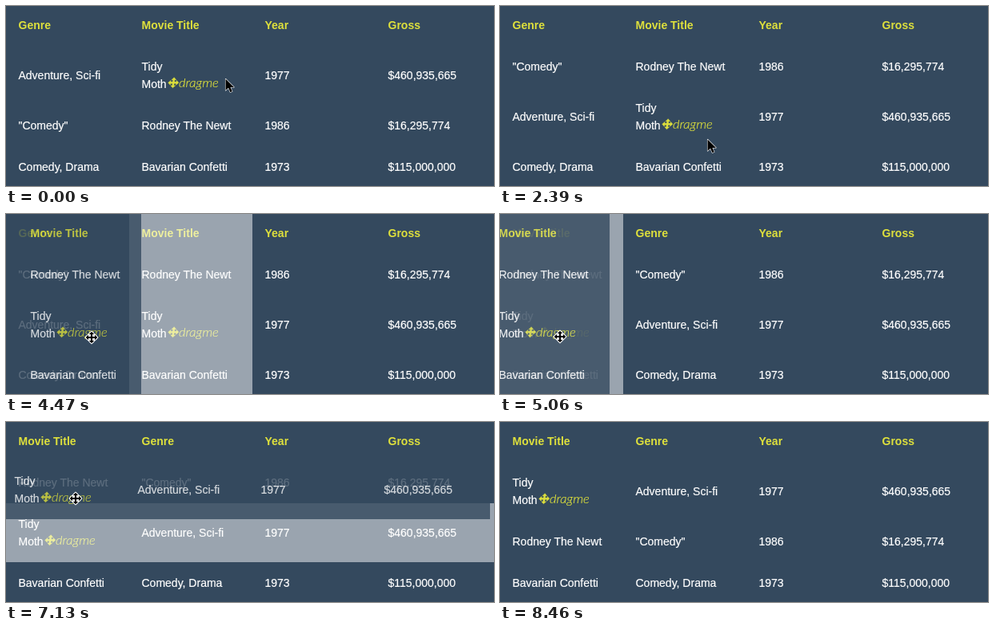
An HTML page for the animation above (9.05 s loop, 610 px wide and 226 px high).

```html
<!DOCTYPE html>
<html lang="en">
<head>
<meta charset="utf-8">
<title>Draggable table</title>
<style>
  html, body { margin: 0; width: 100%; height: 100%; overflow: hidden; background: #34495e; }
  svg { display: block; width: 610px; height: 226px; }
  text { font: 14px "Liberation Sans", Arial, sans-serif; fill: #fff; stroke: #fff; stroke-width: .2px; white-space: pre; }
  .head { font-weight: bold; fill: #dee03c; stroke: none; }
  .handle { font: italic 300 16.5px Lato, sans-serif; fill: #dee03c; stroke: #dee03c; }
</style>
</head>
<body>
<svg id="stage" viewBox="0 0 610 226"></svg>
<script>
const LOOP = 9050, WIDTH = 610, HEIGHT = 226, COL = 154, PAD = 15.5;
const BG = '#34495e', YELLOW = '#dee03c';
const CROSS = 'M0-7.3L3.2-4H1.1V-1.1H4V-3.2L7.3 0L4 3.2V1.1H1.1V4H3.2L0 7.3L-3.2 4H-1.1V1.1H-4V3.2L-7.3 0L-4-3.2V-1.1H-1.1V-4H-3.2Z';
const ARROW = 'M.5.5V15L4 11.8L6.4 17.3L8.8 16.3L6.4 10.9H11Z';

const head = { height: 52, cells: ['Genre', 'Movie Title', 'Year', 'Gross'], head: true };
const moth = { height: 74, cells: ['Adventure, Sci-fi', ['Tidy', 'Moth'], '1977', '$460,935,665'] };
const newt = { height: 52, cells: ['"Comedy"', 'Rodney The Newt', '1986', '$16,295,774'] };
const confetti = { height: 52, cells: ['Comedy, Drama', 'Bavarian Confetti', '1973', '$115,000,000'] };

// Each drag lifts the moth row or the title column; the table reorders at `swap`.
const drags = [
  { start: 1050, swap: 1640, drop: 2390, grab: [254, 103], axis: 'row', origin: 50 },
  { start: 3880, swap: 5060, drop: 5650, grab: [246, 155], axis: 'col', origin: COL },
  { start: 6690, swap: 7860, drop: 8160, grab: [92, 150], axis: 'row', origin: 102 }
];

// Pointer positions: time, x, y
const pointer = [
  [0, 274, 91], [150, 268, 92], [300, 258, 98], [450, 254, 101],
  [1050, 254, 107], [1200, 255, 120], [1350, 256, 138], [1500, 257, 157], [1640, 259, 167], [1790, 259, 168],
  [2390, 259, 167], [2540, 260, 175], [2690, 255, 167], [2840, 248, 158], [2980, 246, 155],
  [3880, 242, 155], [4030, 222, 155], [4180, 183, 155], [4320, 138, 155], [4470, 107, 155],
  [4620, 93, 155], [4760, 85, 155], [4910, 79, 155], [5060, 75, 154], [5200, 75, 154],
  [5650, 77, 154], [5800, 96, 152], [5950, 95, 151], [6100, 93, 150], [6240, 92, 150],
  [6690, 92, 146], [6840, 91, 132], [6990, 89, 114], [7130, 87, 96], [7280, 87, 82],
  [7430, 87, 72], [7570, 87, 66], [7720, 87, 62], [7860, 87, 60],
  [8160, 88, 60], [8310, 105, 154], [8460, -50, 0]
];

const within = (t, from, to) => t >= from && t < to;
const arrowShown = t => t < 300 || within(t, 2390, 2840) || t >= 8160;

const rect = (x, y, w, h, fill, opacity = 1) =>
  `<rect x="${x}" y="${y}" width="${w}" height="${h}" fill="${fill}" opacity="${opacity}"/>`;

const label = (x, y, string, cls = '') => `<text x="${x}" y="${y}" class="${cls}">${string}</text>`;

function cell(row, content, x, y) {
  if (!Array.isArray(content)) {
    return label(x, y + row.height / 2 + 5, content, row.head ? 'head' : '');
  }
  return label(x, y + 31, content[0]) + label(x, y + 53, content[1]) +
    `<path d="${CROSS}" fill="${YELLOW}" stroke="${YELLOW}" stroke-width=".5" ` +
    `transform="translate(${x + 39.8} ${y + 46.3}) skewX(-8) scale(.9)"/>` +
    label(x + 46.5, y + 52, 'dragme', 'handle');
}

function table(rows, cols, keep = () => true) {
  let y = -2, out = '';
  for (const row of rows) {
    cols.forEach((col, i) => {
      if (keep(row, col)) out += cell(row, row.cells[col], PAD + i * COL, y);
    });
    y += row.height;
  }
  return out;
}

function dragLayer(drag, t, x, y, rows, cols) {
  const dx = x - drag.grab[0], dy = y - drag.grab[1];
  const byRow = drag.axis === 'row';
  const size = byRow ? [WIDTH, moth.height] : [COL, HEIGHT];
  const place = byRow ? [0, rows[1] === moth ? 50 : 102] : [cols.indexOf(1) * COL, 0];
  const home = byRow ? [0, drag.origin] : [drag.origin, 0];
  const shift = byRow ? [dx, dy + home[1] - place[1]] : [dx + home[0] - place[0], 0];
  const inside = byRow ? row => row === moth : (row, col) => col === 1;
  return rect(...place, ...size, '#fff', .5) +
    `<g opacity=".8" transform="translate(${shift})">` +
    rect(...place, ...size, BG) + table(rows, cols, inside) + '</g>';
}

function cursor(t, x, y) {
  const [shape, width] = arrowShown(t) ? [ARROW, 1.1] : [CROSS, 2.2];
  return `<path d="${shape}" transform="translate(${x} ${y})" stroke="#fff" stroke-width="${width}" ` +
    'stroke-linejoin="round" paint-order="stroke"/>';
}

function picture(t, x, y) {
  const mothBelow = within(t, drags[0].swap, drags[2].swap);
  const rows = [head, ...(mothBelow ? [newt, moth] : [moth, newt]), confetti];
  const cols = t < drags[1].swap ? [0, 1, 2, 3] : [1, 0, 2, 3];
  const drag = drags.find(d => within(t, d.start, d.drop));
  return rect(0, 0, WIDTH, HEIGHT, BG) + table(rows, cols) +
    (drag ? dragLayer(drag, t, x, y, rows, cols) : '') + cursor(t, x, y);
}

const stage = document.getElementById('stage');
let shown = null;

function update() {
  const t = performance.now() % LOOP;
  const pose = pointer.findLast(p => p[0] <= t);
  if (pose !== shown) {
    shown = pose;
    stage.innerHTML = picture(...pose);
  }
  requestAnimationFrame(update);
}
update();
</script>
</body>
</html>
```
